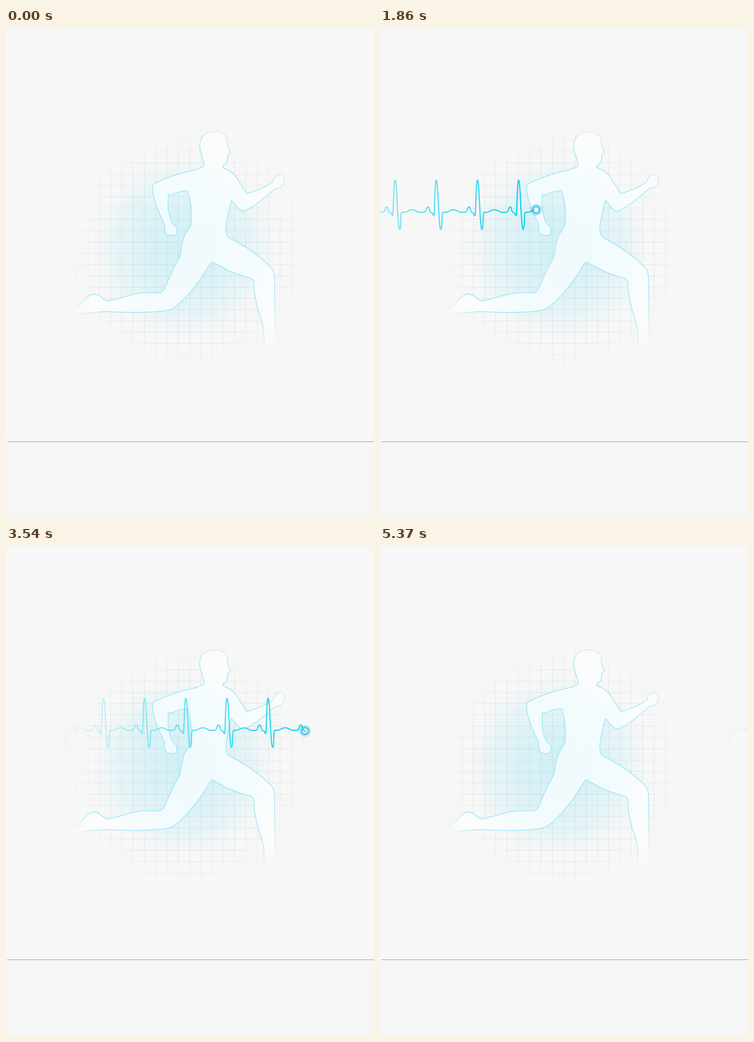
An HTML page with a canvas for the animation above (5.43 s loop, 648 by 864 pixels).

```html
<!DOCTYPE html>
<html lang="en">
<head>
<meta charset="utf-8">
<title>Heartbeat</title>
<style>
html, body { margin: 0; width: 100%; height: 100%; overflow: hidden; background: #f7f7f7; }
canvas { display: block; }
</style>
</head>
<body>
<canvas id="stage" width="648" height="864"></canvas>
<script>
const W = 648, H = 864, LOOP = 5430, STEP = 30;
const ctx = document.getElementById('stage').getContext('2d');

// Outline of the runner
const HEAD_AND_ARM = 'M349 242C348 229 341 222 341 207C342 192 351 183 365 183' +
  'C380 182 389 188 390 199C389 208 392 213 395 219Q396 222 391 222C390 232 390 240 383 242' +
  'Q381 245 383 247Q396 251 404 261Q410 270 424 292Q458 282 470 271Q473 259 484 258' +
  'Q492 262 490 273Q486 282 474 283Q440 314 421 322Q414 324 411 320L397 304';
const LEGS = 'Q388 338 387 354Q388 368 393 370Q440 394 468 424Q473 428 473 450L474 530' +
  'Q474 545 480 549L455 572L454 535Q451 515 445 500Q435 465 437 451Q436 443 430 441' +
  'Q405 434 390 427Q372 417 364 413Q361 412 358 418Q341 447 325 465Q300 495 284 498' +
  'Q245 504 180 500Q140 501 113 509L113 501Q130 490 142 476Q154 464 166 473' +
  'Q173 481 181 481C205 477 222 467 245 467L271 467Q276 466 280 458Q292 428 307 402';
const BACK_ARM = 'Q309 380 314 367Q319 358 326 346Q329 315 320 287Q308 286 293 294L286 294' +
  'Q283 326 294 346Q301 350 301 356L300 364Q293 368 283 364Q279 360 279 345' +
  'Q272 332 268 321Q258 297 258 281Q258 276 264 273Q300 257 325 252Q347 247 349 242Z';

// One beat: cubic segments, x relative to the tall peak
const BEAT_START = [-23, 325];
const BEAT = [
  [-17, 325.5, -18, 315.5, -15, 315.5],
  [-11.5, 315.5, -13, 325, -9, 325.5],
  [-5.5, 326, -6, 331, -4.5, 331],
  [-2.5, 331, -3, 268.5, 0, 268.5],
  [3.5, 268.5, 4, 355, 8, 355],
  [11, 355, 9, 325, 12, 325],
  [22, 325.5, 24, 320.5, 30, 320.5],
  [36, 320.5, 39, 325, 44, 325]
];
const FIRST_PEAK = 26.6, BEAT_WIDTH = 72.5;

// [time, x] keys of the glowing tip, the line end behind it and the fading tail
const TIP = [[60, -10], [600, 73], [1200, 166], [1740, 250], [1860, 275], [2310, 340],
  [2880, 427], [2970, 443], [3450, 516], [3540, 526.5], [4020, 598], [4410, 660], [LOOP, 817]];
const LAG = [[1740, 0], [1860, 4], [2310, 2], [2970, -1]];
const TAIL = [[60, -440], [2970, 0], [3540, 90], [4500, 240], [5190, 570], [5370, 598], [LOOP, 608]];
const FADE = 428;

function keyed(keys, v) {
  if (v <= keys[0][0]) return keys[0][1];
  for (let i = 1; i < keys.length; i++) {
    const [a, ya] = keys[i - 1], [b, yb] = keys[i];
    if (v <= b) return ya + (yb - ya) * (v - a) / (b - a);
  }
  return keys[keys.length - 1][1];
}

function tracePulse() {
  const pts = [];
  for (let n = -1; n < 10; n++) {
    const ox = FIRST_PEAK + n * BEAT_WIDTH;
    let [x, y] = BEAT_START;
    pts.push([ox + x, y]);
    for (const [ax, ay, bx, by, ex, ey] of BEAT) {
      for (let i = 1; i <= 20; i++) {
        const u = i / 20, v = 1 - u;
        const mix = (p, a, b, e) => v * v * v * p + 3 * v * v * u * a + 3 * v * u * u * b + u * u * u * e;
        pts.push([ox + mix(x, ax, bx, ex), mix(y, ay, by, ey)]);
      }
      x = ex; y = ey;
    }
  }
  return pts;
}
const pulse = tracePulse();

function radial(g, x, y, r, stops) {
  const grad = g.createRadialGradient(x, y, 0, x, y, r);
  for (const [at, color] of stops) grad.addColorStop(at, color);
  return grad;
}

function makeBackdrop() {
  const c = document.createElement('canvas');
  c.width = W; c.height = H;
  const g = c.getContext('2d');
  g.fillStyle = '#f7f7f7';
  g.fillRect(0, 0, W, H);
  g.fillStyle = '#f6f6f6';
  g.fillRect(0, 730, W, H - 730);
  g.fillStyle = '#a5a5a5';
  g.fillRect(2, 729, W - 2, 1);

  g.fillStyle = radial(g, 314, 388, 160, [
    [0, 'rgba(205,239,247,.9)'], [0.4, 'rgba(208,240,247,.78)'],
    [0.75, 'rgba(215,241,246,.5)'], [1, 'rgba(225,243,246,0)']]);
  g.fillRect(150, 220, 330, 340);

  g.strokeStyle = radial(g, 320, 390, 232, [
    [0, 'rgba(150,170,172,.2)'], [0.7, 'rgba(160,172,174,.2)'], [1, 'rgba(170,175,175,0)']]);
  g.lineWidth = 1;
  g.beginPath();
  for (let i = 0; i < 24; i++) {
    const x = Math.round(85 + i * 19.9) - 0.5, y = Math.round(159 + i * 19.9) - 0.5;
    g.moveTo(x, 150); g.lineTo(x, 630);
    g.moveTo(80, y); g.lineTo(560, y);
  }
  g.stroke();

  const runner = new Path2D(HEAD_AND_ARM + LEGS + BACK_ARM);
  g.fillStyle = radial(g, 317, 388, 238, [
    [0, 'rgba(247,253,255,.82)'], [0.5, 'rgba(247,253,255,.82)'],
    [0.82, 'rgba(253,253,253,.85)'], [1, 'rgba(252,252,252,0)']]);
  g.fill(runner);
  g.strokeStyle = radial(g, 317, 388, 236, [
    [0, 'rgba(160,232,246,1)'], [0.76, 'rgba(165,234,246,1)'],
    [0.89, 'rgba(195,235,240,.7)'], [1, 'rgba(220,240,242,0)']]);
  g.lineWidth = 1.5;
  g.lineJoin = 'round';
  g.stroke(runner);
  return c;
}
const backdrop = makeBackdrop();

function drawTip(x, y) {
  ctx.fillStyle = radial(ctx, x, y, 11.5, [
    [0, '#fff'], [0.33, '#fff'], [0.42, 'rgba(70,186,222,.95)'],
    [0.62, 'rgba(80,192,226,.7)'], [1, 'rgba(110,205,232,0)']]);
  ctx.beginPath();
  ctx.arc(x, y, 11.5, 0, Math.PI * 2);
  ctx.fill();
}

function drawPulse(end, tail) {
  const grad = ctx.createLinearGradient(tail, 0, tail + FADE, 0);
  grad.addColorStop(0, 'rgba(0,208,238,0)');
  grad.addColorStop(0.5, 'rgba(0,208,238,.57)');
  grad.addColorStop(1, 'rgba(0,208,238,1)');
  ctx.strokeStyle = grad;
  ctx.lineWidth = 2;
  ctx.lineJoin = ctx.lineCap = 'round';
  ctx.beginPath();
  for (const [x, y] of pulse) {
    if (x >= end) break;
    ctx.lineTo(x, y);
  }
  ctx.lineTo(end, keyed(pulse, end));
  ctx.stroke();
}

function draw(time) {
  const t = Math.floor((time % LOOP) / STEP) * STEP;
  ctx.drawImage(backdrop, 0, 0);
  if (t >= 60) {
    const x = keyed(TIP, t);
    if (x < W + 12) drawTip(x, keyed(pulse, x));
    drawPulse(Math.min(x - keyed(LAG, t), W + 10), keyed(TAIL, t));
  }
}

const start = performance.now();
function tick() {
  draw(performance.now() - start);
  requestAnimationFrame(tick);
}
tick();
</script>
</body>
</html>
```
